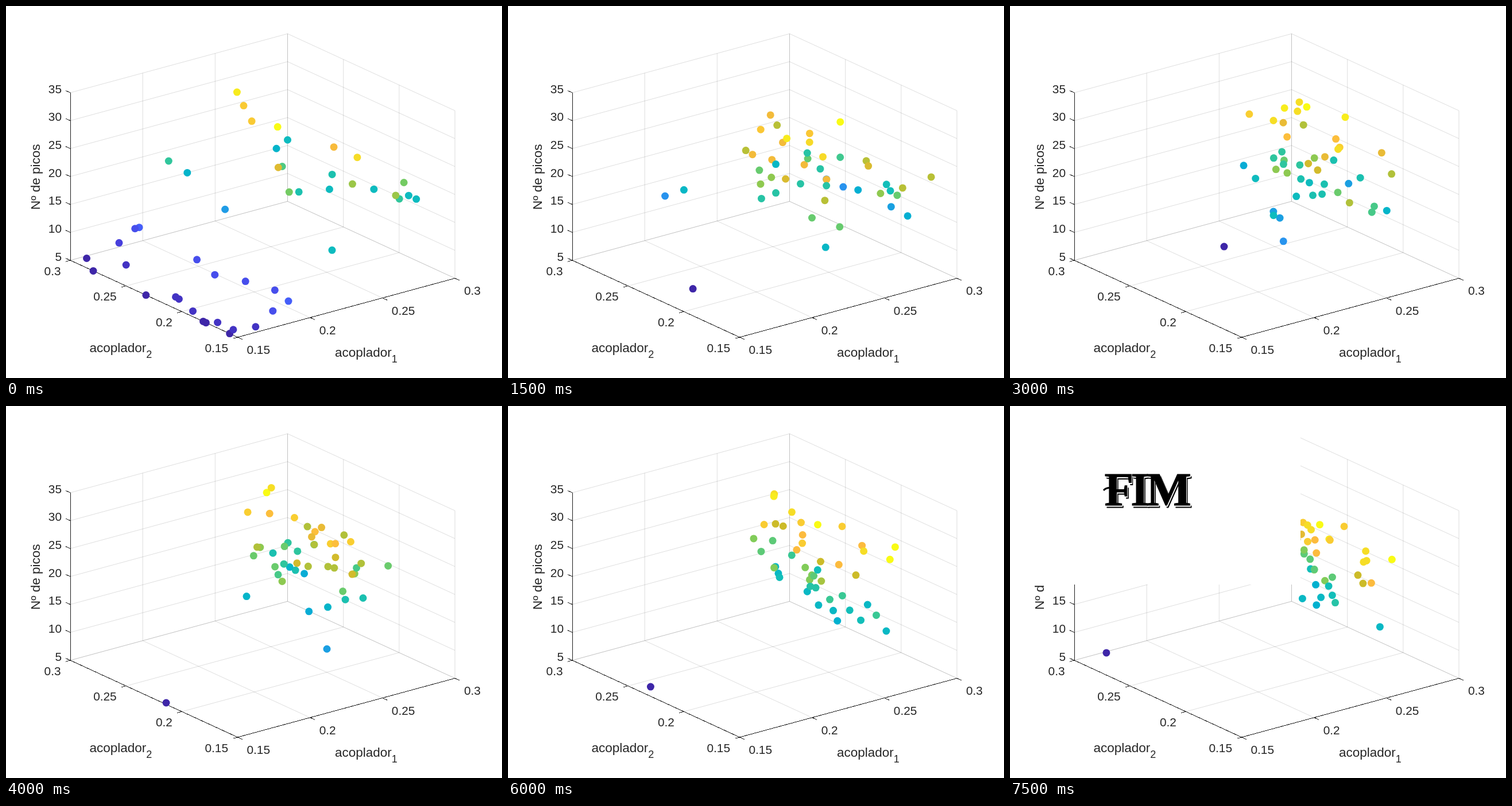
These frames come from a looping animation (864 by 648 pixels, 8000 ms). An HTML page:

```html
<!DOCTYPE html>
<html lang="pt">
<head>
<meta charset="utf-8">
<title>Nº de picos</title>
<style>
html, body { margin: 0; width: 100%; height: 100%; overflow: hidden; background: #fff; }
svg { display: block; width: 864px; height: 648px; }
text { font-family: "Liberation Sans", Arial, sans-serif; fill: #262626; }
.tick { font-size: 20.8px; }
.label { font-size: 22.5px; }
.sub { font-size: 18px; }
.grid { stroke: #262626; stroke-opacity: .15; }
.axis { stroke: #262626; shape-rendering: crispEdges; }
#end text {
  font: bold 83px "Liberation Serif", "Times New Roman", serif;
  letter-spacing: -5px;
  stroke-width: 1px;
}
#end .ink { fill: #000; stroke: #000; }
#end .gap { fill: #fff; stroke: #fff; }
</style>
</head>
<body>
<svg viewBox="0 0 864 648">
  <g id="axes" fill="none" stroke-width="1"></g>
  <g id="names">
    <text class="label" x="145.5" y="602.5">acoplador<tspan class="sub" dy="10.5">2</tspan></text>
    <text class="label" x="573" y="610.5">acoplador<tspan class="sub" dy="10.5">1</tspan></text>
    <text class="label" transform="translate(59 355) rotate(-90)">Nº de picos</text>
  </g>
  <g id="dots"></g>
  <g id="end">
    <rect width="506" height="311" fill="#fff"/>
    <text class="ink" x="167" y="176.5">FIM</text>
    <text class="gap" x="165.5" y="175">FIM</text>
    <text class="ink" x="164.5" y="173">FIM</text>
    <path d="M163 147q5-6 16-4" fill="none" stroke="#000" stroke-width="3"/>
  </g>
</svg>
<script>
const $ = id => document.getElementById(id);
const STEP = 500, COUNT = 16, POPULATION = 46, RADIUS = 6.5;
const Z_MIN = 5, Z_MAX = 35;

function add(parent, tag, attrs, text) {
  const el = document.createElementNS("http://www.w3.org/2000/svg", tag);
  for (const key in attrs) el.setAttribute(key, attrs[key]);
  if (text) el.textContent = text;
  parent.appendChild(el);
  return el;
}

// u runs along acoplador 1, v along acoplador 2, w upwards (each 0..1).
const project = (u, v, w) => [
  403.5 + 378.5 * u - 291.5 * v,
  577 - 102.7 * u - 134 * v - 292 * w
];

function line(kind, from, to) {
  const [x1, y1] = project(...from), [x2, y2] = project(...to);
  add($("axes"), "line", { class: kind, x1, y1, x2, y2 });
}

function tick(pos, dx, dy) {
  const [x, y] = project(...pos);
  add($("axes"), "line", { class: "axis", x1: x, y1: y, x2: x + dx, y2: y + dy });
  return [x, y];
}

function tickText(x, y, anchor, value) {
  add($("names"), "text", { class: "tick", x, y, "text-anchor": anchor }, String(value));
}

function drawAxes() {
  for (let i = 0; i <= 3; i++) {
    const s = i / 3;
    line("grid", [s, 0, 0], [s, 1, 0]);
    line("grid", [0, s, 0], [1, s, 0]);
    line("grid", [s, 1, 0], [s, 1, 1]);
    line("grid", [1, s, 0], [1, s, 1]);
  }
  for (let i = 0; i <= 6; i++) {
    line("grid", [0, 1, i / 6], [1, 1, i / 6]);
    line("grid", [1, 0, i / 6], [1, 1, i / 6]);
  }
  line("axis", [0, 0, 0], [1, 0, 0]);
  line("axis", [0, 0, 0], [0, 1, 0]);
  line("axis", [0, 1, 0], [0, 1, 1]);
  for (let i = 0; i <= 3; i++) {
    const value = (15 + 5 * i) / 100;
    let [x, y] = tick([i / 3, 0, 0], 8, 3.6);
    tickText(x + 16, y + 29, "start", value);
    [x, y] = tick([0, i / 3, 0], -8, 2.2);
    tickText(x - 16.5, y + 25.5, "end", value);
  }
  for (let i = 0; i <= 6; i++) {
    const [x, y] = tick([0, 1, i / 6], -8, -3.6);
    tickText(x - 15, y + .5, "end", Z_MIN + 5 * i);
  }
}

// Colour scale, evenly spaced stops from low to high.
const SCALE = [
  [62, 38, 168], [71, 62, 219], [71, 91, 249], [45, 131, 252], [39, 151, 235],
  [0, 177, 207], [18, 190, 185], [57, 200, 148], [129, 204, 89], [204, 187, 41],
  [252, 187, 62], [246, 221, 38], [249, 251, 21]
];

function colour(level) {
  const pos = level * (SCALE.length - 1);
  const i = Math.min(Math.floor(pos), SCALE.length - 2);
  const mixed = SCALE[i].map((c, k) => Math.round(c + (SCALE[i + 1][k] - c) * (pos - i)));
  return `rgb(${mixed})`;
}

let seed = 2024;
function random() {
  seed = (seed * 16807) % 2147483647;
  return seed / 2147483647;
}

const clamp = x => Math.min(1, Math.max(0, x));
const bell = () => random() + random() + random() + random() - 2;

// The number of peaks is highest around u = 0.75 and falls off to both sides.
function individual(u, v) {
  const hill = Math.exp(-(((u - .75) / .4) ** 2));
  return { u, v, z: Math.round(Z_MIN + 25 * hill * (.4 + .6 * random())) };
}

const scatter = () => individual(clamp(random() * 1.2 - .1), clamp(random() * 1.1 - .05));

// Later generations gather closer to a curve across the floor.
function breed(age) {
  const v = clamp(.65 * random() + .45 * random() - .05);
  const spread = Math.max(.05, .21 - .013 * age);
  return individual(clamp(.68 + .18 * v * v + 1.7 * spread * bell()), v);
}

const survives = p => random() < .5 * (p.z - Z_MIN) / 25;

// The weakest individual of each generation lies on the floor at (u, v).
const WEAKEST = [
  [.06, .98], [.26, .70], [.20, .65], [.17, .50], [.09, .48], [.60, .90], [.52, .78], [.52, .78],
  [.01, .44], [.50, .90], [.15, .27], [.63, .75], [.06, .61], [.04, .32], [.14, .99]
];

function evolve() {
  const all = [];
  let group = Array.from({ length: POPULATION }, scatter);
  WEAKEST.forEach(([u, v], age) => {
    if (age) group = group.map(p => survives(p) ? p : breed(age));
    all.push([...group, { u, v, z: Z_MIN }]);
  });
  return [...all, all[all.length - 1]];
}

const generations = evolve();
let shown = -1;

function update(time) {
  const index = Math.floor(time / STEP) % COUNT;
  if (index === shown) return;
  shown = index;
  const group = generations[index];
  const best = Math.max(...group.map(p => p.z));
  $("dots").replaceChildren();
  for (const { u, v, z } of group) {
    const [cx, cy] = project(u, v, (z - Z_MIN) / (Z_MAX - Z_MIN));
    const fill = colour((z - Z_MIN) / (best - Z_MIN));
    add($("dots"), "circle", { cx, cy, r: RADIUS, fill });
  }
  $("end").style.display = index === COUNT - 1 ? "" : "none";
}

function run() {
  update(performance.now());
  requestAnimationFrame(run);
}

drawAxes();
run();
</script>
</body>
</html>
```
